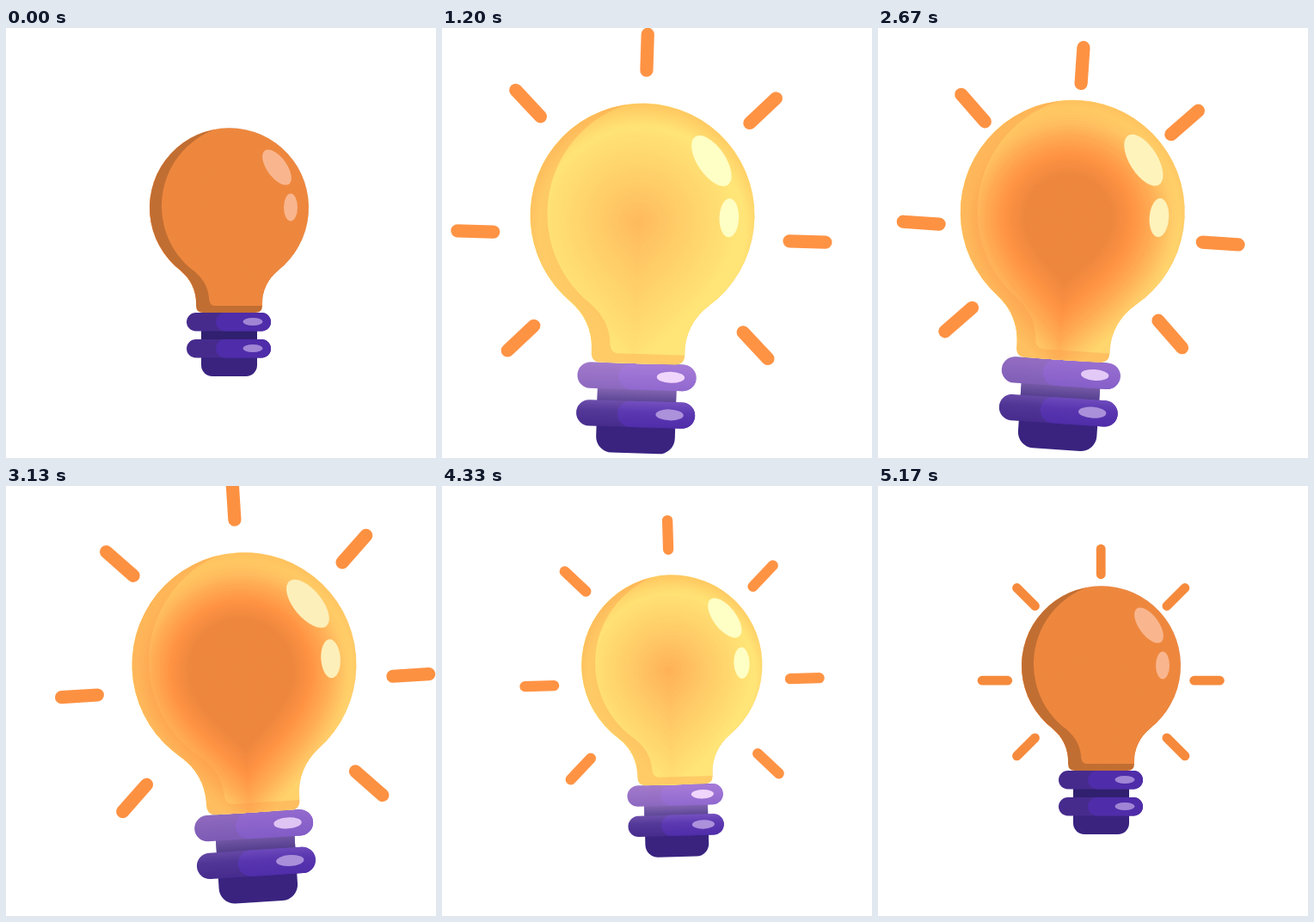
Recreate the animation shown at these times as an HTML page with a canvas. Size 500 by 500 pixels, loop 5.21 s.

```html
<!DOCTYPE html>
<html lang="en">
<head>
<meta charset="utf-8">
<title>Light bulb</title>
<style>
  html, body { margin: 0; width: 100%; height: 100%; overflow: hidden; background: #fff; }
  canvas { display: block; width: 100vmin; height: 100vmin; }
</style>
</head>
<body>
<canvas id="stage" width="500" height="500"></canvas>
<script>
const ctx = document.getElementById('stage').getContext('2d');
const LOOP = 5210;
const CX = 259.5, CY = 209, R = 92.5;
const RAD = Math.PI / 180;

const clamp = v => Math.max(0, Math.min(1, v));
const mix = (a, b, p) => a + (b - a) * p;
const mixAll = (a, b, p) => a.map((v, i) => mix(v, b[i], p));
const css = c => `rgba(${c[0]},${c[1]},${c[2]},${c[3] ?? 1})`;

// Progress 0..1 of a move, eased like cubic-bezier(.33, 0, soft, 1)
function move(t, start, length, soft = 0.15) {
  const u = (t - start) / length;
  if (u <= 0) return 0;
  if (u >= 1) return 1;
  let lo = 0, hi = 1;
  for (let i = 0; i < 22; i++) {
    const s = (lo + hi) / 2, r = 1 - s;
    if (3 * r * r * s * 0.33 + 3 * r * s * s * soft + s * s * s < u) lo = s; else hi = s;
  }
  return lo * lo * (3 - 2 * lo);
}

const RAY_START = 150, RAY_TIME = 460;
const PULSE_START = 570, PULSE = 1065, PULSES = 4;

function pose(t) {
  const grow = move(t, 0, 500), shrink = move(t, 3800, 1370);
  const left = move(t, 984, 600), right = move(t, 2580, 520);
  const back = move(t, 3800, 1370, 0.3);
  const beat = (t - PULSE_START) / PULSE;
  const beating = beat > 0 && beat < PULSES;
  const glow = -0.9 + 1.9 * move(t, 0, 480, 0.67) - 0.64 * move(t, 1000, 2130, 0.67)
    + 0.59 * move(t, 3130, 820, 0.67) - 1.85 * move(t, 4330, 800, 0.67);
  return {
    x: CX - 42.5 * left + 60 * right - 17.5 * back,
    y: CY + 13.6 * grow - 7 * left - 7.7 * right + 1.1 * shrink,
    scale: 1 + 0.41 * (grow - shrink),
    tilt: 4.6 * move(t, 984, 700, 0.3) - 8.3 * move(t, 2580, 620, 0.3) + 3.7 * back,
    shown: move(t, RAY_START, RAY_TIME, 0.3),
    out: beating ? (14.6 - 3 * shrink) * Math.abs(Math.sin(Math.PI * beat)) ** 1.5 : 0,
    glow,
    lit: clamp((glow + 0.9) / 1.6)
  };
}

const bulb = new Path2D(
  'M203 282 A92.5 92.5 0 1 1 316 282 C304 292 298 305 298 320 L298 323 ' +
  'Q298 331 290 331 L229 331 Q221 331 221 323 L221 320 C221 305 215 292 203 282 Z');
const shade = new Path2D(bulb);
shade.addPath(new Path2D(
  'M400 323 L243 323 Q236 323 236 313 Q234 293 214 279 A95 95 0 0 1 276 112 L400 112 Z'));

const RAMP = [[238, 135, 62], [255, 147, 67], [255, 171, 84], [255, 202, 103], [255, 229, 119]];
function ramp(v) {
  const n = v * (RAMP.length - 1), i = Math.min(RAMP.length - 2, Math.floor(n));
  return css(mixAll(RAMP[i], RAMP[i + 1], n - i));
}

function drop(r) {
  const x = CX - 3, y = CY + 5;
  ctx.beginPath();
  ctx.arc(x, y, r, Math.PI, 0);
  ctx.bezierCurveTo(x + r, y + r * 0.65, x + r * 0.35, y + r * 1.1, x, y + r * 1.5);
  ctx.bezierCurveTo(x - r * 0.35, y + r * 1.1, x - r, y + r * 0.65, x - r, y);
  ctx.fill();
}

function oval(x, y, rx, ry, turn, color) {
  ctx.fillStyle = color;
  ctx.beginPath();
  ctx.ellipse(x, y, rx, ry, turn, 0, 2 * Math.PI);
  ctx.fill();
}

function box(x, y, w, h, r, color) {
  ctx.fillStyle = color;
  ctx.beginPath();
  ctx.roundRect(x, y, w, h, r);
  ctx.fill();
}

// Nested drops run from the orange core to the yellow edge
function drawGlass({ glow, lit }) {
  const core = mix(-1.55, 0.65, glow), slope = 0.4 + 1.85 * (1 - glow);
  const warm = clamp(lit * 1.3);
  const tone = d => ramp(clamp(core + slope * d) * warm);
  ctx.fillStyle = tone(1);
  ctx.fill(bulb);
  ctx.save();
  ctx.clip(bulb);
  for (let d = 1; d > 0.02; d -= 0.025) {
    ctx.fillStyle = tone(d);
    drop(R * d);
  }
  const rim = ctx.createRadialGradient(CX, CY + 12, 85, CX, CY + 12, 105);
  rim.addColorStop(0, 'rgba(255,160,65,0)');
  rim.addColorStop(1, `rgba(255,160,65,${0.45 * lit})`);
  oval(CX, CY, R, R, 0, rim);
  ctx.fillStyle = css(mixAll([0, 0, 0, 0.19], [250, 150, 70, 0.33], warm));
  ctx.fill(shade, 'evenodd');
  ctx.restore();
  const shine = css(mixAll([249, 182, 142], [254, 255, 196], lit));
  oval(315, 162, 11.5, 24, -36 * RAD, shine);
  oval(331, 208.5, 8, 16, 0, shine);
}

function drawCap({ lit }) {
  const bands = [331, 362];
  box(227, 345, 65, 60, [0, 0, 13, 13], '#39237f');
  box(227, 350, 65, 14, 0, '#30206f');
  for (const y of bands) {
    box(210, y, 98, 21.5, 10.75, '#462b8d');
    box(244, y, 64, 21.5, 10.75, '#4f2ca9');
  }
  const light = ctx.createLinearGradient(0, 331, 0, 384);
  light.addColorStop(0, `rgba(230,180,250,${0.58 * lit})`);
  light.addColorStop(0.42, `rgba(220,175,250,${0.46 * lit})`);
  light.addColorStop(0.75, `rgba(205,170,250,${0.1 * lit})`);
  light.addColorStop(1, 'rgba(200,170,250,0)');
  ctx.save();
  ctx.globalCompositeOperation = 'source-atop';
  ctx.fillStyle = light;
  ctx.fillRect(205, 331, 108, 54);
  ctx.restore();
  bands.forEach((y, i) => {
    const shine = mixAll([160, 133, 213], [240, 214, 252], lit * (1 - 0.85 * i));
    oval(287, y + 10.5, 11.5, 4.6, 0, css(shine));
  });
}

function drawRays(t, { shown, out, lit }) {
  if (!shown) return;
  const slide = (1 - shown) * 40.5;
  const outer = mixAll([246, 138, 60], [255, 147, 68], lit * clamp((t - 300) / 400));
  const inner = mixAll(outer, [255, 173, 94], clamp((750 - t) / 350));
  const paint = ctx.createLinearGradient(-20, 0, 20 - slide, 0);
  paint.addColorStop(0, css(inner));
  paint.addColorStop(1, css(outer));
  for (let deg = -225; deg <= 45; deg += 45) {
    const a = deg * RAD, c = Math.cos(2 * a);
    ctx.save();
    // the ring is flattened: side rays sit lower, the top one higher
    ctx.translate(259.2 + 123.3 * Math.cos(a), 216.2 + 123.3 * Math.sin(a) + 7.5 * c + 2.5 * c * c);
    ctx.rotate(a);
    if (shown < 1) {
      ctx.beginPath();
      ctx.rect(-30, -10, 50.25, 20);
      ctx.clip();
    }
    ctx.translate(out + slide, 0);
    box(-20.25, -5.4, 40.5, 10.8, 5.4, paint);
    ctx.restore();
  }
}

function draw(t) {
  const p = pose(t);
  ctx.clearRect(0, 0, 500, 500);
  ctx.save();
  ctx.translate(p.x, p.y);
  ctx.rotate(p.tilt * RAD);
  ctx.scale(p.scale, p.scale);
  ctx.translate(-CX, -CY);
  drawCap(p);
  drawGlass(p);
  drawRays(t, p);
  ctx.restore();
}

const start = performance.now();
function tick() {
  draw((performance.now() - start) % LOOP);
  requestAnimationFrame(tick);
}
tick();
</script>
</body>
</html>
```
